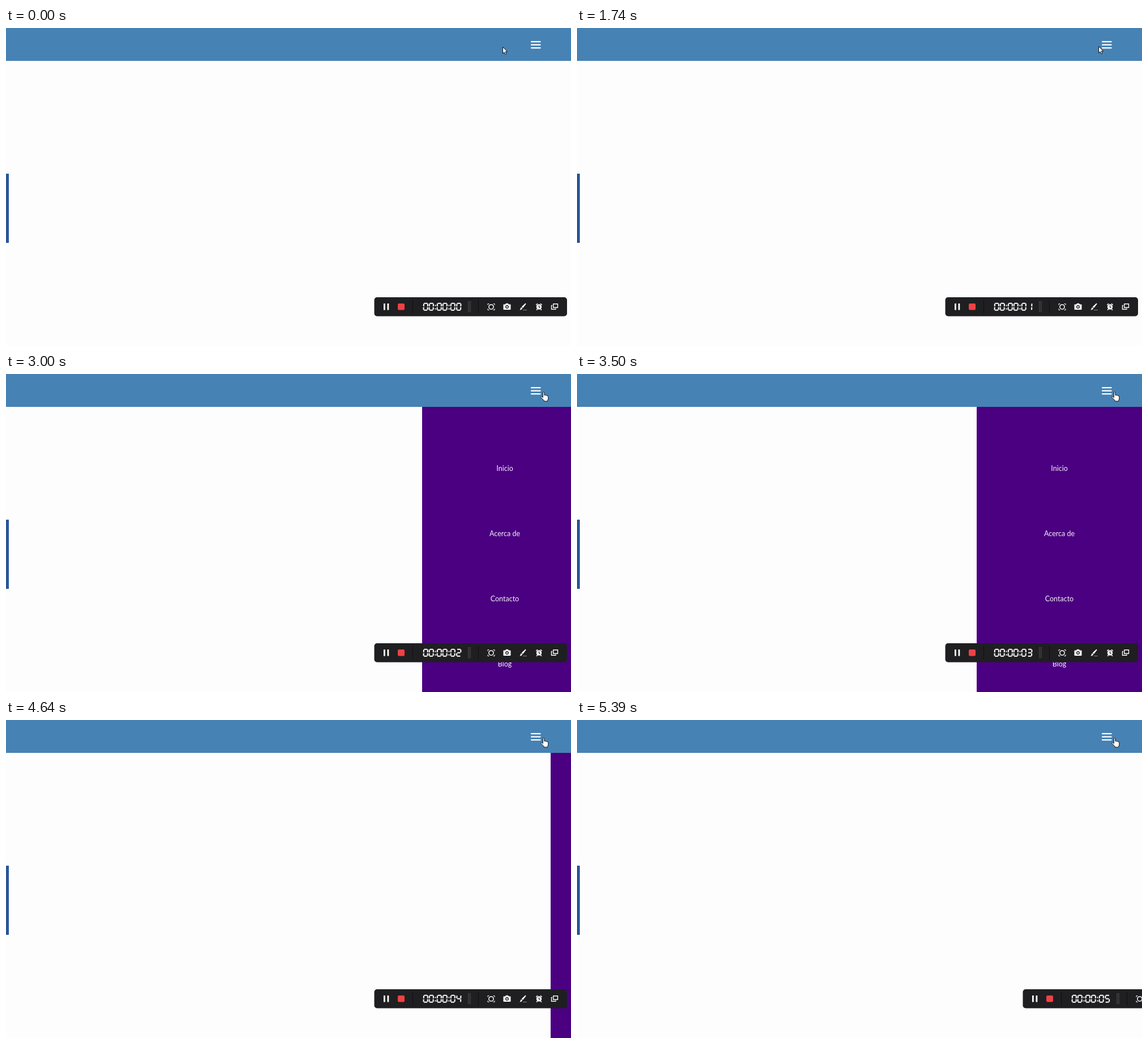
These frames come from a looping animation (998 px wide and 561 px high, 5510 ms). An HTML page:

```html
<!DOCTYPE html>
<html lang="es">
<head>
<meta charset="utf-8">
<title>Menú lateral</title>
<style>
  html, body { margin: 0; width: 100%; height: 100%; overflow: hidden; background: #fdfdfd; }
  svg { display: block; width: 998px; height: 561px; }
  .menu text { font: 12.5px Lato, "Open Sans", sans-serif; fill: #f6f0fa; text-anchor: middle; }
  .line { fill: none; stroke: #fff; stroke-linecap: round; stroke-linejoin: round; }
  .seg { fill: none; stroke: #fff; stroke-width: 2; }
  .pointer { fill: #fff; stroke: #111; stroke-width: 1; stroke-linejoin: round; }
</style>
</head>
<body>
<svg viewBox="0 0 998 561">
  <defs>
    <radialGradient id="glow">
      <stop offset="0" stop-color="#fff0f0"/>
      <stop offset=".4" stop-color="#ff7d88"/>
      <stop offset=".75" stop-color="#f63850"/>
      <stop offset="1" stop-color="#e83a4c"/>
    </radialGradient>
    <pattern id="grip" width="2" height="2" patternUnits="userSpaceOnUse">
      <rect width="1" height="1" fill="#6a6a6e"/>
    </pattern>
  </defs>

  <rect width="998" height="561" fill="#fdfdfd"/>
  <rect y="257" width="5" height="122" fill="#2a5599"/>

  <g id="menu" class="menu">
    <rect y="58" width="292" height="503" fill="#4b0082"/>
    <text x="146" y="170.5">Inicio</text>
    <text x="146" y="285.5">Acerca de</text>
    <text x="146" y="400.5">Contacto</text>
    <text x="146" y="515.5">Blog</text>
  </g>

  <rect width="998" height="58" fill="#4682b4"/>
  <path class="line" stroke-width="2.2" d="M928 24.2h15.6M928 29.7h15.6M928 35.2h15.6"/>

  <g id="bar">
    <rect x="650.5" y="475" width="340.5" height="33.5" rx="5" fill="#1f1f22"/>
    <path d="M667 486h2.8v11.5h-2.8zM673.5 486h2.8v11.5h-2.8z" fill="#fff"/>
    <rect x="692" y="486" width="12" height="11.5" rx="2.2" fill="#f04143"/>
    <path d="M718.5 480v23M834.5 480v23" stroke="#08080a" stroke-dasharray="2 1"/>
    <g id="clock"></g>
    <rect x="815" y="481" width="6" height="21" fill="url(#grip)"/>

    <!-- region -->
    <g class="line" stroke-width="1.3">
      <circle cx="857" cy="492" r="4.1" stroke-width="1.5"/>
      <path stroke-width="1" d="M851 488.5v-2h2M861 486.500h2v2M863 495.500v2h-2M853 497.500h-2v-2"/>
    </g>
    <!-- camera -->
    <path fill="#fff" d="M879.500 487.500h2.500l1.200-1.700h3.600l1.200 1.700h2.500q1 0 1 1v7.500q0 1-1 1h-11q-1 0-1-1v-7.500q0-1 1-1z"/>
    <circle cx="885" cy="492" r="2.300" fill="#fff" stroke="#1f1f22" stroke-width="1.400"/>
    <!-- pen -->
    <path fill="#fff" d="M917.500 485.500l1.200 1.200-5.700 7.300-2.200-2.200zM910.200 492.500l2.100 2.100q-1.500 3-5 2.900 1.700-1.300 1.500-3z"/>
    <path d="M913 497.500h7" stroke="#8a8a8c"/>
    <!-- alarm -->
    <circle cx="941.500" cy="492" r="4.700" fill="#fff"/>
    <path class="line" stroke-width="1.500" d="M936.700 488.300l2-1.800M946.300 488.300l-2-1.800M938.500 496l-1 1.300M944.500 496l1 1.300"/>
    <path d="M941.500 489.300v3l2 1.200" fill="none" stroke="#1f1f22" stroke-width="1.200"/>
    <!-- windows -->
    <path class="line" stroke-width="1.400" d="M966.800 486.700h7.700v6.600h-7.700zM964.500 489.500h-1v6.800h7.500v-1"/>
  </g>

  <circle id="click" cx="945.500" cy="30.500" fill="url(#glow)"/>
  <path id="arrow" class="pointer" d="M.5.500V12l2.700-2.400 1.800 4 2-.9-1.800-3.900h3.500z"/>
  <path id="hand" class="pointer" d="M4.300 10.500V2Q4.300.6 5.600.6T6.900 2v4.300q1.500-.9 2.400.5 1.500-.7 2.300.6 2.200-.6 2.200 1.400v3.300q0 2-1.200 3.400v1.500H6.200v-1.300L1.100 10.500q-.7-1.200.3-1.700 1.200-.4 2.900 1.700z"/>
</svg>

<script>
const LOOP = 5510, FIRST = 230, STEP = 126;
const WIDTH = 998, MENU = 292, SLIDE = 300;
const CLICKS = [2750, 4388];
const OPEN = 2815, CLOSE = 4464, DRAG = 5018, HAND = 2000;
// time, x, y of the pointer
const TRAIL = [[0, 877, 33], [860, 877, 33], [1364, 881, 33], [1490, 885, 33],
               [1742, 921, 32], [1994, 931, 31], [2250, 944, 31], [LOOP, 944, 31]];
const SEGMENTS = {
  a: 'M1.600 1H7.400', b: 'M8 1.500V6.300', c: 'M8 7.700V12.500', d: 'M1.600 13H7.400',
  e: 'M1 7.700V12.500', f: 'M1 1.500V6.300', g: 'M1.800 7H7.200'
};
const DIGITS = ['abcdef', 'bc', 'abdeg', 'abcdg', 'bcfg', 'acdfg'];

const el = id => document.getElementById(id);
const menu = el('menu'), bar = el('bar'), clock = el('clock');
const ripple = el('click'), arrow = el('arrow'), hand = el('hand');
const clamp = x => Math.min(1, Math.max(0, x));
const move = (node, x, y = 0) => node.setAttribute('transform', `translate(${x} ${y})`);
const show = (node, on) => node.setAttribute('visibility', on ? 'visible' : 'hidden');

// cubic-bezier(.25, .1, .25, 1), solved by bisection
function ease(x) {
  if (x <= 0 || x >= 1) return clamp(x);
  const curve = (s, p, q) => 3 * s * (1 - s) ** 2 * p + 3 * s * s * (1 - s) * q + s ** 3;
  let lo = 0, hi = 1;
  for (let i = 0; i < 24; i++) {
    const mid = (lo + hi) / 2;
    if (curve(mid, .25, .25) < x) lo = mid; else hi = mid;
  }
  return curve(lo, .1, 1);
}

function pointerAt(t) {
  const i = Math.max(1, TRAIL.findIndex(p => p[0] > t));
  const [t0, x0, y0] = TRAIL[i - 1], [t1, x1, y1] = TRAIL[i];
  const k = (t - t0) / (t1 - t0);
  return [Math.round(x0 + (x1 - x0) * k), Math.round(y0 + (y1 - y0) * k)];
}

const digit = (n, x) => `<path class="seg" transform="translate(${x} 484.800) skewX(-2)" d="${
  [...DIGITS[n]].map(s => SEGMENTS[s]).join('')}"/>`;
const colon = x => `<path fill="#fff" d="M${x} 488.500h2v2h-2zM${x} 494.500h2v2h-2z"/>`;

let shown = -1;
function setClock(sec) {
  if (sec === shown) return;
  shown = sec;
  clock.innerHTML = [737, 747, 761, 771, 785, 795.5]
    .map((x, i) => digit(i < 5 ? 0 : sec, x)).join('') + colon(757.500) + colon(781.500);
}

function draw(t) {
  const slide = ease((t - OPEN) / SLIDE) - ease((t - CLOSE) / SLIDE);
  move(menu, Math.round(WIDTH - MENU * slide));
  move(bar, Math.round(137 * clamp((t - DRAG) / 378) ** 1.75));
  setClock(Math.max(0, Math.floor((t - 610) / 880)));

  const start = CLICKS.find(c => t >= c && t < c + 2 * STEP);
  show(ripple, start !== undefined);
  if (start !== undefined) {
    const age = (t - start) / STEP;
    ripple.setAttribute('r', 7.5 + 6 * age);
    ripple.setAttribute('opacity', 1 - .45 * age);
  }

  const [x, y] = pointerAt(t);
  show(arrow, t < HAND);
  show(hand, t >= HAND);
  move(arrow, x, y);
  move(hand, x, y);
}

const tick = t => t < FIRST ? 0 : FIRST + STEP * Math.floor((t - FIRST + 6) / STEP);

const origin = performance.now();
function run() {
  draw(tick((performance.now() - origin) % LOOP));
  requestAnimationFrame(run);
}
run();
</script>
</body>
</html>
```
